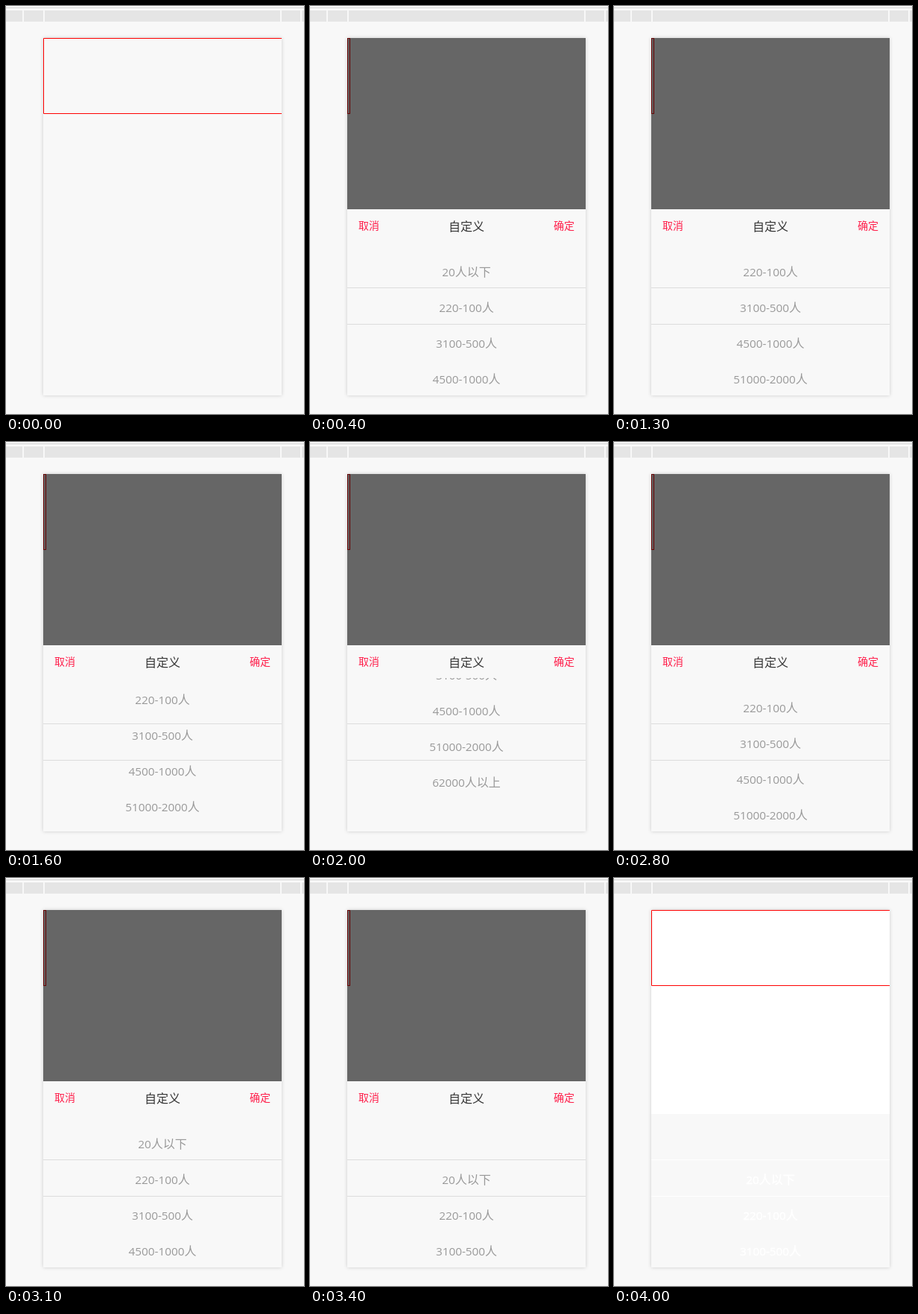
Recreate the animation shown at these times as an HTML page. Size 400 px wide and 548 px high, loop 4800 ms.

```html
<!DOCTYPE html>
<html lang="zh">
<head>
<meta charset="utf-8">
<title>Picker</title>
<style>
  html, body { margin: 0; width: 100%; height: 100%; overflow: hidden; background: #f8f8f8; }
  svg { position: absolute; left: 0; top: 0; }
  .phone { position: absolute; left: 50px; top: 43px; width: 320px; height: 480px; background: #f8f8f8; box-shadow: 0 0 5px rgba(0, 0, 0, .18); }
  text { font-family: "Open Sans", "Noto Sans CJK SC", "Noto Sans CJK", sans-serif; font-size: 15.3px; }
  .han { font-family: "Noto Sans CJK SC", "Noto Sans CJK", sans-serif; font-size: 16px; }
  .action { font-size: 14px; fill: #ff1f4b; }
  .rows { fill: #999; text-anchor: middle; }
  .rules { fill: #ddd; }
  .fading .rows { fill: #fff; stroke: #fff; stroke-width: .5px; }
  .fading .rules { fill: #fff; }
  .fading .open, .idle .open, .idle .sheet, .open-state .frame, .open-state .blank, .idle .blank { display: none; }
</style>
</head>
<body>
<div class="phone"></div>
<svg id="stage" class="idle" width="400" height="548" viewBox="0 0 400 548">
  <defs><clipPath id="window"><rect x="50" y="317" width="320" height="206"/></clipPath></defs>
  <rect y="2" width="400" height="1" fill="#d2d2d2"/>
  <path fill="#e5e5e5" d="M0 6h22v15H0zM24 6h26v15H24zM52 6h316v15H52zM370 6h25v15H370zM397 6h3v15H397z"/>
  <rect class="blank" x="50" y="43" width="320" height="274" fill="#fff"/>
  <path class="frame" d="M370 43.5H50.5V144.5H370" fill="none" stroke="#f00"/>
  <g class="open">
    <rect x="50" y="43" width="320" height="230" fill="#666"/>
    <rect x="50.5" y="43.5" width="3" height="101" fill="none" stroke="#600"/>
    <text class="han action" x="65" y="300">取消</text>
    <text class="han" x="210" y="302" text-anchor="middle" fill="#333">自定义</text>
    <text class="han action" x="355" y="300" text-anchor="end">确定</text>
  </g>
  <g class="sheet">
    <path class="rules" d="M50 378h320v1H50zM50 427h320v1H50z"/>
    <g clip-path="url(#window)"><g id="rows" class="rows"></g></g>
  </g>
</svg>
<script>
const LOOP = 4800, ROW = 48, FIRST_BASELINE = 411;
const labels = ["20人以下", "220-100人", "3100-500人", "4500-1000人", "51000-2000人", "62000人以上"];
// [start ms, state, scroll offset in px]
const steps = [
  [0, "idle", 0],
  [400, "open-state", -48],
  [1300, "open-state", -96],
  [1600, "open-state", -107],
  [1700, "open-state", -144],
  [2000, "open-state", -188],
  [2100, "open-state", -192],
  [2400, "open-state", -148],
  [2500, "open-state", -144],
  [2800, "open-state", -96],
  [3100, "open-state", -48],
  [3300, "open-state", -37],
  [3400, "open-state", 0],
  [4000, "fading", 0]
];
const stage = document.getElementById("stage");
const rows = document.getElementById("rows");

rows.innerHTML = labels.map((label, i) => {
  const content = label.replace(/[^\d-]+/g, '<tspan class="han">$&</tspan>');
  return `<text x="210" y="${FIRST_BASELINE + i * ROW}">${content}</text>`;
}).join("");

let current;
function draw() {
  const time = performance.now() % LOOP;
  const step = steps.findLast(([start]) => start <= time);
  if (step !== current) {
    current = step;
    stage.setAttribute("class", step[1]);
    rows.setAttribute("transform", `translate(0 ${step[2]})`);
  }
  requestAnimationFrame(draw);
}
draw();
</script>
</body>
</html>
```
